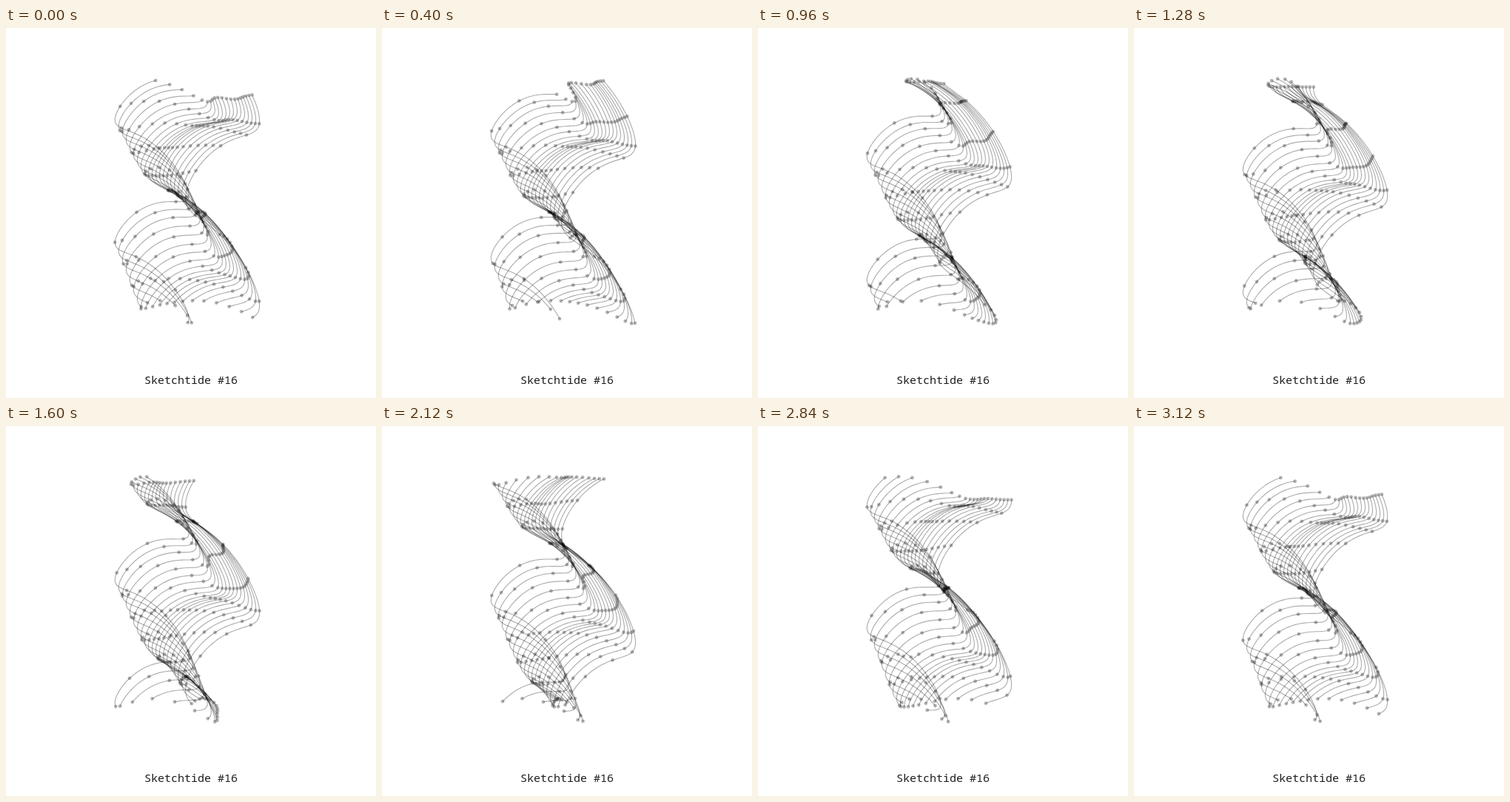
Animation of 500x500 px, one loop 3.16 s. Source, as an HTML page with a canvas:

```html
<!DOCTYPE html>
<html lang="en">
<head>
<meta charset="utf-8">
<title>Sketchtide #16</title>
<style>
  html, body { margin: 0; width: 100%; height: 100%; overflow: hidden; background: #fff; }
  canvas { position: absolute; left: 0; top: 0; }
  p {
    position: absolute; left: 0; top: 465px; width: 500px; margin: 0;
    font: 15px/20px "Noto Sans Mono", "DejaVu Sans Mono", monospace;
    text-align: center; color: #1c1c1c; white-space: pre;
  }
</style>
</head>
<body>
<canvas id="stage" width="500" height="500"></canvas>
<p>Sketchtide #16</p>
<script>
const ctx = document.getElementById('stage').getContext('2d');
const LOOP = 3160, TICK = 40, TAU = 2 * Math.PI;
const ROWS = 10, SUB = 8;

// Starting phase of each string, left to right
const PHASE = [
  -1.47, -1.18, -0.91, -0.60, -0.30, -0.02, 0.19, 0.37, 0.47, 0.50,
  0.48, 0.43, 0.39, 0.38, 0.41, 0.47, 0.54, 0.59, 0.62, 0.645
];

// Phase lag per row: strings on the right twist more slowly
const lag = i => 1.135 - 0.02 * i - 0.011 * Math.sin(TAU * (i / 19) ** 2);

// Position on string i at row j (fractions allowed)
function point(i, j, turn) {
  const a = turn + PHASE[i] - lag(i) * j;
  return [
    197.2 + 5.02 * i + 50 * Math.cos(a),
    79.7 + 30 * j + 10 * (Math.cos(a) + Math.cos(2 * a))
  ];
}

function drawString(i, turn) {
  ctx.beginPath();
  for (let k = 0; k <= ROWS * SUB; k++) ctx.lineTo(...point(i, k / SUB, turn));
  ctx.stroke();
  for (let j = 0; j <= ROWS; j++) {
    ctx.beginPath();
    ctx.arc(...point(i, j, turn), 2.4, 0, TAU);
    ctx.fill();
  }
}

function draw(ms) {
  const t = Math.floor((ms % LOOP) / TICK) * TICK;
  const turn = TAU * t / LOOP;
  ctx.clearRect(0, 0, 500, 500);
  ctx.lineWidth = 1.15;
  ctx.lineJoin = 'round';
  ctx.strokeStyle = 'rgba(0, 0, 0, 0.32)';
  ctx.fillStyle = 'rgba(0, 0, 0, 0.3)';
  for (let i = 0; i < PHASE.length; i++) drawString(i, turn);
}

const start = performance.now();
function frame() {
  draw(performance.now() - start);
  requestAnimationFrame(frame);
}
frame();
</script>
</body>
</html>
```
